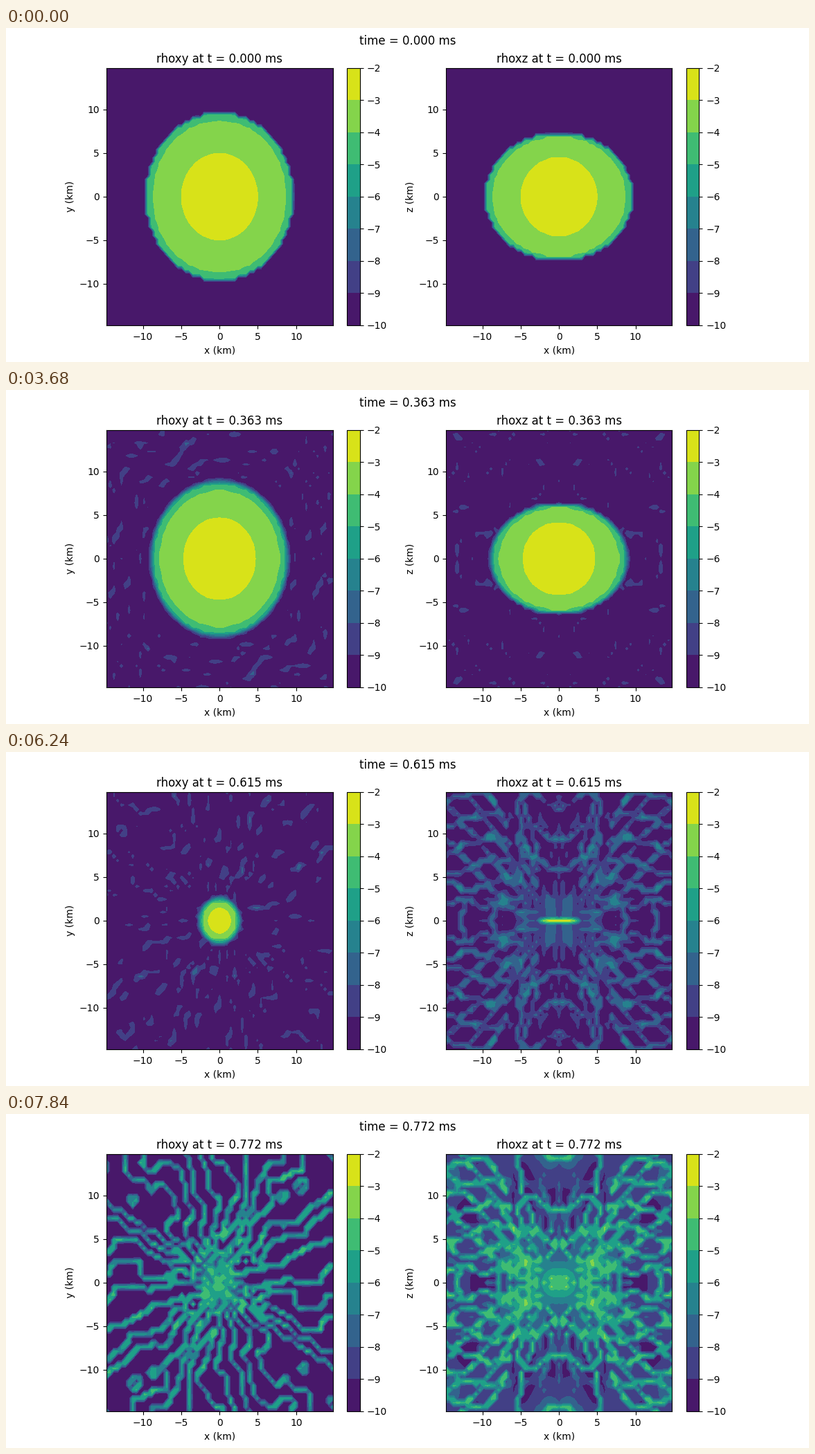
A matplotlib script that plays this animation: 1159 px wide and 483 px high, repeating every 8 s.

```python
import numpy as np
import matplotlib.pyplot as plt
from matplotlib.animation import FuncAnimation
from matplotlib.cm import ScalarMappable
from matplotlib.colors import BoundaryNorm, ListedColormap

FRAMES, INTERVAL = 50, 160
DT = 0.015763           # ms of simulated time per frame
HALF, N = 14.767, 61    # km, grid points per side
MID = N // 2
AXIS = np.linspace(-HALF, HALF, N)
X, Y = np.meshgrid(AXIS, AXIS)
QX, QZ = X[MID:, MID:], Y[MID:, MID:]

# Collapse of the star: radii in km at two density levels, and flattening
KEYS = [0, 15, 23, 32, 39, 43]
CORE_RADIUS = [5.0, 5.0, 4.75, 3.3, 1.5, 0]
BODY_RADIUS = [8.8, 8.6, 7.9, 6.3, 2.2, 0]
FLATTENING = [0.795, 0.767, 0.753, 0.571, 0.09, 0.05]


def ramp(frame, start, end):
    return min(max((frame - start) / (end - start), 0), 1)


def smooth_key(frame, values):
    """Cubic Hermite interpolation through the keys."""
    slopes = np.gradient(values, KEYS)
    i = min(np.searchsorted(KEYS, frame, "right"), len(KEYS) - 1) - 1
    h = KEYS[i + 1] - KEYS[i]
    u = min((frame - KEYS[i]) / h, 1)
    value = ((2 * u**3 - 3 * u**2 + 1) * values[i]
             + (u**3 - 2 * u**2 + u) * h * slopes[i]
             + (3 * u**2 - 2 * u**3) * values[i + 1]
             + (u**3 - u**2) * h * slopes[i + 1])
    return max(value, 0)


def ripple(x, y, seed, k, count=7):
    """Even random field of about unit size with wave numbers near k."""
    rng = np.random.default_rng(seed)
    total = 0
    for angle in rng.uniform(0, np.pi, count):
        kk = k * rng.uniform(0.6, 1.4)
        sign = rng.choice([-1, 1])
        total = total + sign * np.cos(kk * (x * np.cos(angle) + y * np.sin(angle)))
    return total / np.sqrt(count / 2)


def star(frame, x, y, polar):
    """Log density from nested ellipses, linear between them."""
    core = smooth_key(frame, CORE_RADIUS)
    body = smooth_key(frame, BODY_RADIUS)
    flat = smooth_key(frame, FLATTENING) if polar else 1
    rim = 0.09 * body
    skirt = min(0.5, 0.01 + 0.035 * frame, 0.2 * body)
    thin = 0.5 * flat if polar else 1
    core_b, body_b = min(core * flat**0.4, 0.8 * body * flat), body * flat
    ellipses = [(0, 0), (core, core_b), (body, body_b),
                (body + rim, body_b + rim * thin),
                (body + rim + skirt, body_b + (rim + skirt) * thin)]
    centre = -2.1 + 3 * ramp(frame, 39, 43) - 9 * ramp(frame, 43, 45)
    levels = [centre, -3, -4, -5, -9]

    r, phi = np.hypot(x, y), np.arctan2(y, x)
    edges = []
    for a, b in ellipses:
        a, b = a + 1e-4 * (len(edges) + 1), b + 1e-4 * (len(edges) + 1)
        edges.append(a * b / np.hypot(b * np.cos(phi), a * np.sin(phi)))
    edges[0] = 0 * r
    f = np.full(r.shape, -10.0)
    for i in reversed(range(4)):
        u = np.clip((r - edges[i]) / (edges[i + 1] - edges[i]), 0, 1)
        f = np.where(r < edges[i + 1], levels[i] + u * (levels[i + 1] - levels[i]), f)
    return f


def filaments(frame, x, y, seed, inner, outer):
    """One-cell-wide lines that turn from shells into radial rays."""
    g = np.exp(0.012 * (frame - 43))
    r, phi = np.hypot(x, y), np.arctan2(y, x)
    wob = ripple(x * g, y * g, seed, 0.55)
    jag = ripple(x * g, y * g, seed + 1, 1.6)
    near = np.exp(-(r / 6) ** 4)
    fan = near * np.cos(inner * phi + wob) + (1 - near) * np.cos(outer * phi + 1.2 * wob + 0.5 * jag)
    shell = np.cos(2 * np.pi * r * g / 3 + 1.3 * wob + 0.6 * jag)
    q = ramp(frame, 27, 41)
    up = (1 - q) * shell + q * fan > 0
    line = np.zeros(up.shape, bool)
    line[:, :-1] |= up[:, 1:] != up[:, :-1]
    line[:-1] |= up[1:] != up[:-1]
    return line


def specks(frame, shape, seed, chance):
    return np.random.default_rng(1000 * seed + frame).random(shape) < chance


def raise_to(f, mask, level):
    return np.where(mask, np.maximum(f, level), f)


def plane_xy(frame):
    r = np.hypot(X, Y)
    onset, late, end = ramp(frame, 16, 22), ramp(frame, 39, 43), ramp(frame, 43, 49)

    f = -10 + 0.2 * onset + (0.7 * late + 2.4 * end) * np.exp(-(r / 2.3) ** 2)
    stray = 0.0007 * max(frame - 8, 0) * (1 - onset)
    f = raise_to(f, specks(frame, X.shape, 1, stray) & (r < 13), -8.6)

    peak = -10.5 + 1.25 * onset + 0.2 * ramp(frame, 23, 32) + 1.5 * late + 1.9 * end
    grain = ripple(X, Y, 9 + frame // 4, 2)
    f = raise_to(f, filaments(frame, X, Y, 5, 10, 16), peak + 0.5 * grain)

    dots = specks(frame, X.shape, 2, 0.1 * late)
    dots = (dots | dots[::-1, ::-1]) & (r < 6.5)
    f = raise_to(f, dots, -7.3 + 3 * end - 0.12 * r)
    return np.maximum(f, star(frame, X, Y, False))


def ridge_curves(fall):
    """Arches, rays and brackets of one quadrant, moving in with the fall."""
    t = np.linspace(0, 1, 90)
    for z in (4.8, 8.2, 12, 18):
        top = z - fall
        if top < 2:
            continue
        arch_x = [0, 1.2, 2.8, 4.3, 5.4, 4.8, 3]
        arch_z = [top, top + 0.2, top + 1.5, top + 1.9, top + 0.4, 0.75 * top, 0.45 * top]
        knots = np.linspace(0, 1, len(arch_x))
        yield np.interp(t, knots, arch_x), np.interp(t, knots, arch_z)
    for height in np.arange(2.2, 18, 1.8):
        x = 2.5 + 0.3 * height + 13 * t
        zig = 0.45 * np.sin(1.3 * x + 2 * height)
        yield x, (height - 0.12 * fall) * np.tanh(x / 7) ** 1.2 + zig * np.minimum(1, x / 8)
    for front in (7.7, 11.7, 17):
        yield front - fall - 0.5 * t**2, 1.9 * t


def on_ridge(frame):
    fall = 0.24 * (frame - 43) + 0.4 * max(frame - 43, 0)
    nearest = np.full(QX.shape, 99.0)
    for cx, cz in ridge_curves(fall):
        dist = np.hypot(QX[..., None] - cx, QZ[..., None] - cz).min(axis=-1)
        nearest = np.minimum(nearest, dist)
    return nearest < 0.27


def plane_xz(frame):
    r = np.hypot(QX, QZ)
    onset, middle = ramp(frame, 16, 22), ramp(frame, 32, 39)
    late, end = ramp(frame, 39, 43), ramp(frame, 43, 49)

    f = (-10 + 0.1 * onset + 0.2 * middle + late
         + 0.5 * late * ripple(QX, QZ, 21, 0.8)
         + (middle + 1.8 * late) * np.exp(-(QX / 5) ** 2 - (QZ / 2.4) ** 2))
    stray = 0.012 * max(frame - 8, 0) * (1 - onset)
    halo = (np.hypot(QX / 11.5, QZ / 9.5) < 1) & (QZ > 2)
    f = raise_to(f, specks(frame, QX.shape, 3, stray) & halo, -8.3)

    grain = ripple(QX, QZ, 30 + frame // 3, 2.2)
    faint = -10.5 + 1.25 * onset + 0.6 * middle + 1.3 * late - 0.12 * middle * (r - 5)
    f = raise_to(f, filaments(frame, QX, QZ, 14, 12, 20), faint + 0.5 * grain)
    bright = -10.5 + 1.8 * ramp(frame, 23, 31) + 1.2 * middle + 3.1 * late - 0.6 * end
    f = raise_to(f, on_ridge(frame), bright + 0.45 * grain)

    dots = specks(frame, QX.shape, 4, 0.12 * middle) & (r < 6.5)
    f = raise_to(f, dots, -7.8 + 4.2 * late - 0.15 * r)
    f = np.maximum(f, star(frame, QX, QZ, True))
    f = np.vstack([f[:0:-1], f])
    return np.hstack([f[:, :0:-1], f])


def band_colors(count):
    return plt.get_cmap("viridis")((np.arange(count) + 0.5) / count)


fig, axes = plt.subplots(1, 2, figsize=(11.59, 4.83), dpi=100)
headline = fig.suptitle("time = 0.000 ms")
bar_levels = np.arange(-10, -1)
for ax, label in zip(axes, "yz"):
    ax.set(xlim=(-HALF, HALF), ylim=(-HALF, HALF),
           xlabel="x (km)", ylabel=f"{label} (km)")
    ax.set_xticks(range(-10, 11, 5))
    ax.set_yticks(range(-10, 11, 5))
    bands = ScalarMappable(BoundaryNorm(bar_levels, 8), ListedColormap(band_colors(8)))
    bar = fig.colorbar(bands, ax=ax, ticks=bar_levels)
    bar.minorticks_off()

drawn = []


def draw(frame):
    while drawn:
        drawn.pop().remove()
    stamp = f"{frame * DT:.3f} ms"
    headline.set_text(f"time = {stamp}")
    # Wider bands while the core is densest
    wide = 27 <= frame <= 37
    levels = np.arange(-10.5, -1.4, 1.5) if wide else bar_levels
    colors = band_colors(len(levels) - 1)
    colors = [colors[0], *colors, colors[-1]]
    for ax, name, plane in zip(axes, ("rhoxy", "rhoxz"), (plane_xy, plane_xz)):
        ax.set_title(f"{name} at t = {stamp}")
        drawn.append(ax.contourf(AXIS, AXIS, plane(frame), levels=levels,
                                 colors=colors, extend="both"))
    return drawn


def start():
    return draw(0)


anim = FuncAnimation(fig, draw, frames=FRAMES, init_func=start,
                     interval=INTERVAL, repeat=True, repeat_delay=0, blit=False)
plt.show()
```
